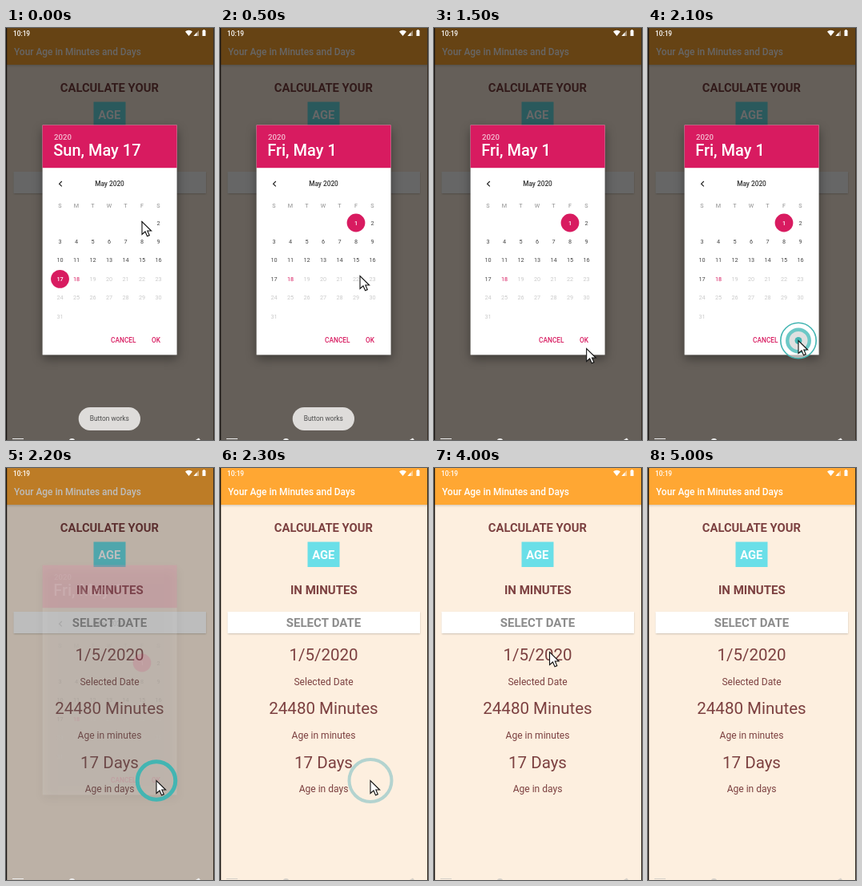
An HTML page with a canvas for the animation above (5.2 s loop, 260 px wide and 516 px high).

```html
<!DOCTYPE html>
<html lang="en">
<meta charset="utf-8">
<title>Age calculator</title>
<style>
  html, body { margin: 0; height: 100%; overflow: hidden; }
  canvas { display: block; }
</style>
<canvas id="stage" width="260" height="516"></canvas>
<script>
const ctx = document.getElementById('stage').getContext('2d');
const LOOP = 5200, STEP = 100;
const PINK = '#d81b60', TEAL = '#43b5b2', MAROON = '#7c4040', ORANGE = '#ffa733';

// time, x, y of the pointer tip
const POINTER = [
  [0, 170, 242], [300, 170, 242], [700, 180, 378], [900, 181, 399], [1200, 181, 399],
  [1400, 192, 406], [1700, 188, 391], [2700, 188, 391], [3200, 133, 368], [3300, 133, 368],
  [3400, 129, 367], [3500, 129, 367], [4000, 144.5, 230], [4100, 144.5, 230], [4300, 75, 490]
];
const ARROW = new Path2D('M0 .5V16.5L4 13L6.5 18.8L9.3 17.6L6.8 12H11.6Z');

function rect(x, y, w, h, color) {
  ctx.fillStyle = color;
  ctx.fillRect(x, y, w, h);
}

function shadowed(color, blur, dy, draw) {
  ctx.save();
  Object.assign(ctx, { shadowColor: color, shadowBlur: blur, shadowOffsetY: dy });
  draw();
  ctx.restore();
}

// y is the middle of the capitals
function text(str, x, y, size, color, weight = 400, align = 'center') {
  ctx.font = `${weight} ${size}px Roboto, sans-serif`;
  ctx.textAlign = align;
  ctx.fillStyle = color;
  ctx.fillText(str, x, y + size * 0.356);
}

function disc(x, y, r, color) {
  ctx.beginPath();
  ctx.arc(x, y, r, 0, 7);
  ctx.fillStyle = color;
  ctx.fill();
}

function ring(x, y, r, width, color) {
  ctx.beginPath();
  ctx.arc(x, y, r, 0, 7);
  ctx.lineWidth = width;
  ctx.strokeStyle = color;
  ctx.stroke();
}

function polygon(color, ...points) {
  ctx.beginPath();
  points.forEach(([x, y]) => ctx.lineTo(x, y));
  ctx.fillStyle = color;
  ctx.fill();
}

function page() {
  rect(0, 0, 260, 516, '#fdefdf');
  shadowed('rgba(0,0,0,.2)', 3, 1, () => rect(0, 0, 260, 46, ORANGE));
  text('Your Age in Minutes and Days', 10, 30, 11.9, '#fff', 500, 'left');
  text('CALCULATE YOUR', 129.3, 74.5, 14.75, MAROON, 700);
  rect(109.5, 92.5, 40, 31.5, '#6adfe8');
  text('AGE', 129.3, 109, 14.75, '#fff', 700);
  text('IN MINUTES', 129.8, 152.5, 15, MAROON, 700);
  shadowed('rgba(0,0,0,.2)', 2, 1, () => rect(9.5, 180, 240.5, 27, '#fff'));
  text('SELECT DATE', 129.5, 194, 15, '#8c8c8c', 700);
  [['1/5/2020', 'Selected Date'], ['24480 Minutes', 'Age in minutes'], ['17 Days', 'Age in days']]
    .forEach(([value, label], i) => {
      text(value, 129.5, 234 + i * 67.2, 20.5, MAROON);
      text(label, 129.5, 267.3 + i * 67.2, 12.06, MAROON);
    });
}

function systemBars(dimmed) {
  text('10:19', 9, 6.6, 8.3, '#fff', 500, 'left');
  polygon('#fff', [224, 4.5], [226, 3.2], [228.5, 2.7], [231, 3.2], [233, 4.5], [228.5, 10]);
  polygon('rgba(255,255,255,.45)', [234.5, 10], [241, 10], [241, 3]);
  polygon('#fff', [234.5, 10], [238.5, 10], [238.5, 5.6]);
  rect(245.5, 3, 4, 7, '#fff');
  rect(246.5, 2, 2, 1, '#fff');
  const nav = dimmed ? '#eee' : '#d5d0c8';
  rect(8, 514, 14, 1, nav);
  disc(82.5, 518, 4, nav);
  polygon(nav, [237, 516], [241, 513.5], [243, 516]);
  rect(0, 0, 1.2, 516, '#181310');
  rect(259, 0, 1, 516, '#3a3027');
}

function calendar(picked) {
  shadowed('rgba(0,0,0,.4)', 12, 5, () => rect(45.6, 121.6, 168, 287.8, '#fff'));
  rect(45.6, 121.6, 168, 53.6, PINK);
  text('2020', 60, 136.3, 9.65, 'rgba(255,255,255,.72)', 500, 'left');
  text(picked === 1 ? 'Fri, May 1' : 'Sun, May 17', 59.2, 152.8, 20, '#fff', 500, 'left');

  ctx.beginPath();
  ctx.moveTo(69.8, 192);
  ctx.lineTo(66.6, 195.2);
  ctx.lineTo(69.8, 198.4);
  ctx.lineWidth = 1.2;
  ctx.strokeStyle = '#222';
  ctx.stroke();
  text('May 2020', 129.5, 195, 8.3, '#333', 500);

  const column = i => 67.5 + i * 20.5;
  [...'SMTWTFS'].forEach((day, i) => text(day, column(i), 222, 7.24, '#8c8c8c'));
  for (let day = 1; day <= 31; day++) {
    const cell = day + 4, x = column(cell % 7), y = 244 + Math.floor(cell / 7) * 23.45;
    if (day === picked) disc(x, y, 11.4, PINK);
    const color = day === picked ? '#fff' : day === 18 ? PINK : day > 18 ? '#cacaca' : '#444';
    text(day, x, y, 7.24, color, day === picked ? 500 : 400);
  }
  text('CANCEL', 146.8, 391.5, 8.3, PINK, 500);
  text('OK', 187.6, 391.5, 8.3, PINK, 500);
}

function toast() {
  ctx.beginPath();
  ctx.roundRect(90.7, 475, 77.3, 29, 14.5);
  ctx.fillStyle = '#dedcda';
  ctx.fill();
  text('Button works', 129.3, 489.5, 8.4, '#4c4c4c');
}

function withAlpha(alpha, draw) {
  if (alpha <= 0) return;
  ctx.globalAlpha = alpha;
  draw();
  ctx.globalAlpha = 1;
}

function clickRipple(t) {
  const k = (t - 1900) / 100, x = 188, y = 391.5;
  if (k < 0 || k >= 5) return;
  if (k < 3) {
    const r = 7.4 * (k + 1);
    disc(x, y, r, 'rgba(255,255,255,.6)');
    ring(x, y, r, 1.6, TEAL);
    disc(x, y, r * 0.62, '#dfe0e0');
    ring(x, y, r * 0.62, r * 0.2, '#6cc8c6');
    disc(x, y, r * 0.2, TEAL);
  } else if (k < 4) {
    ring(x, y, 23.8, 5, TEAL);
  } else {
    ring(x, y, 26.5, 4, '#b3d3cf');
  }
}

function pointer(t) {
  if (t >= 4400) return;
  const next = POINTER.findIndex(p => p[0] > t);
  const b = POINTER[next < 0 ? POINTER.length - 1 : next];
  const a = POINTER[next < 0 ? POINTER.length - 1 : next - 1];
  const p = a === b ? 0 : (t - a[0]) / (b[0] - a[0]);
  ctx.save();
  ctx.translate(a[1] + (b[1] - a[1]) * p, a[2] + (b[2] - a[2]) * p);
  ctx.fillStyle = '#fff';
  ctx.strokeStyle = '#111';
  ctx.lineWidth = 1.1;
  ctx.fill(ARROW);
  ctx.stroke(ARROW);
  ctx.restore();
}

function draw(now) {
  const t = Math.floor(now % LOOP / STEP) * STEP;
  const dim = t < 2200 ? 1 : t < 2300 ? 0.43 : 0;
  const dialog = t < 2200 ? 1 : t < 2300 ? 0.13 : 0;
  const toastFade = Math.min(1, Math.max(0, (t - 600) / 400));

  page();
  rect(0, 0, 260, 516, `rgba(0,0,0,${0.6 * dim})`);
  systemBars(dim > 0);
  withAlpha(dialog, () => calendar(t < 200 ? 17 : 1));
  withAlpha(1 - toastFade ** 4, toast);
  clickRipple(t);
  pointer(t);
}

const start = performance.now();
(function frame() {
  draw(performance.now() - start);
  requestAnimationFrame(frame);
})();
</script>
</html>
```
